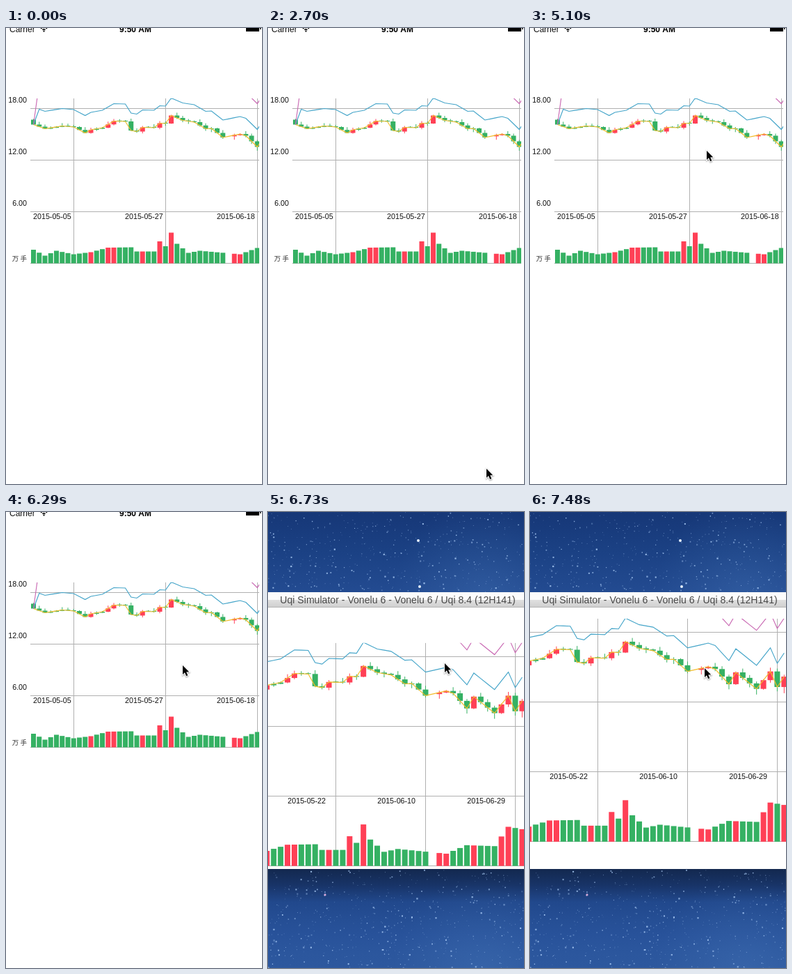
An HTML page with a canvas that plays this animation: 368 by 654 pixels, repeating every 8 s.

```html
<!DOCTYPE html>
<html lang="en">
<head>
<meta charset="utf-8">
<title>Stock chart rotation</title>
<style>
html, body { margin: 0; width: 100%; height: 100%; overflow: hidden; background: #fff; }
canvas { display: block; }
</style>
</head>
<body>
<canvas id="stage" width="368" height="654"></canvas>
<script>
const W = 368, H = 654, LOOP = 8000, ROTATE = 6590, TICK = 150;
const ctx = document.getElementById('stage').getContext('2d');
const RED = '#ff4056', GREEN = '#35b163', GRID = '#b0b0b0';
const FONT = '"Liberation Sans", Arial, sans-serif';
const DAYS = 48, DAY_OFF = 34;

// Daily values on straight lines between turning points [day, value].
function trend(...points) {
  return Array.from({ length: DAYS }, (_, day) => {
    const next = Math.max(1, points.findIndex(p => p[0] >= day));
    const [a, from] = points[next - 1], [b, to] = points[next];
    return from + (to - from) * (day - a) / (b - a);
  });
}

// Portrait pixels: closing price below the 18.00 line, volume above the base.
const close = trend(
  [0, 23], [2, 29], [5, 25], [7, 26.5], [9, 35], [10, 30.5], [12, 27.5], [14, 18], [16, 18.5],
  [17, 31.5], [18, 33], [19, 27], [21, 27.5], [22, 21], [23, 21.5], [24, 10], [26, 17], [28, 19.5],
  [30, 29], [31, 28.5], [33, 41.5], [36, 36.5], [37, 39], [39, 55], [40, 42.5], [43, 60], [45, 41.5],
  [46, 58], [47, 47]);
const volume = trend(
  [0, 19.5], [2, 11], [4, 18], [7, 13], [10, 16], [13, 22.5], [17, 23], [18, 17], [21, 17],
  [22, 31.5], [23, 24.5], [24, 44], [25, 28], [27, 15], [29, 18], [36, 13], [39, 22], [43, 21],
  [45, 41.5], [47, 39]);

const portrait = {
  x0: 39.5, step: 8.25, bar: 7, y0: 115.5, scale: 1, left: 35, right: 364, labelGap: 3.5,
  dates: { 7: '2015-05-05', 23: '2015-05-27', 39: '2015-06-18' }
};
const landscape = {
  x0: -100.9, step: 9.92, bar: 8, scale: 1.353, left: 0, right: W, labelGap: 14.5,
  dates: { 20: '2015-05-22', 33: '2015-06-10', 46: '2015-06-29' }
};

// Pointer moves along quadratic curves: start, end, from, control, to.
const moves = [
  [1500, 1800, [283, 617], [284, 617], [283, 617]],
  [2700, 3150, [313, 631], [262, 480], [241, 369]],
  [4200, 5100, [241, 369], [240, 250], [253, 175]],
  [5250, 6290, [243, 176], [190, 270], [253, 219]],
  [ROTATE, 7480, [253, 219], [254, 207], [250, 223]]
];

function rect(x, y, w, h, color) {
  ctx.fillStyle = color;
  ctx.fillRect(x, y, w, h);
}

function line(points, color, width = 1) {
  ctx.beginPath();
  points.forEach(p => ctx.lineTo(...p));
  ctx.strokeStyle = color;
  ctx.lineWidth = width;
  ctx.stroke();
}

function text(str, x, y, size, align = 'left', color = '#111', weight = '') {
  ctx.font = `${weight} ${size}px ${FONT}`;
  ctx.textAlign = align;
  ctx.fillStyle = color;
  ctx.fillText(str, x, y);
}

function clipped(x, y, w, h, draw) {
  ctx.save();
  ctx.beginPath();
  ctx.rect(x, y, w, h);
  ctx.clip();
  draw();
  ctx.restore();
}

function gradient(y, h, ...colors) {
  const fill = ctx.createLinearGradient(0, y, 0, y + h);
  colors.forEach((color, i) => fill.addColorStop(i / (colors.length - 1), color));
  return fill;
}

function drawDay(c, day, y0, base) {
  const x = c.x0 + day * c.step;
  const change = day ? close[day] - close[day - 1] : 7;
  const color = change < -1.6 ? RED : GREEN; // only clear rises are red
  const end = y0 + close[day] * c.scale;
  const size = Math.max(1, Math.abs(change) * c.scale);
  const top = change > 0 ? end - size : end;
  const high = (1 + day * 7 % 4) * c.scale;
  const low = (.5 + day * 5 % 4) * day / 25 * c.scale;
  line([[x, top - high], [x, top + size + low]], color);
  rect(x - c.bar / 2, top, c.bar, size, color);
  rect(x - c.bar / 2, base, c.bar, -volume[day] * c.scale, color);
}

function drawChart(c, y0 = c.y0, rules = true) {
  const { scale, left, right } = c;
  const top = y0 - 14.5 * scale, base = y0 + 222 * scale;
  const dayX = day => c.x0 + day * c.step;
  const crisp = v => Math.floor(v) + .5;

  clipped(left, top, right - left, base - top + 1, () => {
    for (let i = 0; rules && i < 4; i++) {
      const y = crisp(y0 + i * 74 * scale);
      line([[left, y], [right, y]], GRID);
    }
    for (const day in c.dates) {
      const x = crisp(dayX(+day));
      line([[x, top], [x, base]], GRID);
    }
    for (let day = 0; day < DAYS; day++) {
      if (day !== DAY_OFF) drawDay(c, day, y0, base);
    }
    // The upper bands start at the first close, then keep their distance.
    for (const [offset, color] of [[0, '#f2bd2b'], [25, '#45a5c9'], [62, '#c969b3']]) {
      line(close.map((v, day) => [dayX(day), y0 + (day ? v - offset : v) * scale]), color, 1.15);
    }
  });
  if (rules) {
    for (const day in c.dates) {
      text(c.dates[day], dayX(+day) - c.labelGap, y0 + 148 * scale + 10, 10.7, 'right');
    }
  }
}

function drawPortrait() {
  drawChart(portrait);
  ['18.00', '12.00', '6.00'].forEach((s, i) => text(s, 30, 106.5 + i * 74, 10.7, 'right'));
  ctx.font = '9.5px "Noto Sans CJK SC", "Noto Sans CJK", sans-serif';
  ctx.fillStyle = '#333';
  ctx.fillText('万 手', 30, 334);
}

function drawStatusBar() {
  text('Carrier', 5, 5.5, 12);
  text('9:50 AM', 186, 5.5, 12, 'center', '#000', 'bold');
  rect(345, 0, 19, 5, '#000');
  rect(365, 0, 1.5, 2, '#000');
  for (const r of [2.6, 5.6]) {
    ctx.beginPath();
    ctx.arc(54.5, 4.5, r, -Math.PI * .78, -Math.PI * .22);
    ctx.strokeStyle = '#000';
    ctx.lineWidth = 1.6;
    ctx.stroke();
  }
  rect(53.5, 3.5, 2, 2, '#000');
}

function drawSky(y, h, seed, ...colors) {
  const random = () => (seed = seed * 16807 % 2147483647) / 2147483647;
  rect(0, y, W, h, gradient(y, h, ...colors));
  const glow = ctx.createRadialGradient(310, y + h, 5, 310, y + h, 130);
  glow.addColorStop(0, 'rgba(80,130,195,.25)');
  glow.addColorStop(1, 'rgba(80,130,195,0)');
  rect(0, y, W, h, glow);
  for (let i = 0; i < h * 4; i++) {
    const size = .7 + random() ** 4 * 1.6;
    rect(random() * W, y + random() * h, size, size, `rgba(175,208,250,${.25 + random() * .65})`);
  }
}

function dot(x, y, r, color) {
  ctx.beginPath();
  ctx.arc(x, y, r, 0, Math.PI * 2);
  ctx.fillStyle = color;
  ctx.fill();
}

function drawDesktop() {
  drawSky(0, 115, 71, '#163777', '#1b4184', '#234b91');
  drawSky(512, 142, 913, '#13284f', '#183468', '#21488c', '#254e94', '#28529a', '#2b569d', '#2d589e');
  dot(216, 41, 2, '#e6f2ff');
  dot(218, 107, 2, '#e6f2ff');
  dot(82, 549, 1.6, '#d9a8d8');
  rect(0, 115, W, 11, '#fcfcfc');
  rect(0, 126, W, 10, gradient(126, 10, '#e0e0e0', '#d0d0d0'));
  rect(0, 136, W, 1, '#b4b4b4');
  text('Uqi Simulator - Vonelu 6 - Vonelu 6 / Uqi 8.4 (12H141)', 186.5, 131, 14.1, 'center', '#484848');
}

function drawRotation(step) {
  drawDesktop();
  const shift = step < 6 ? 242 * Math.exp(-1.94 * step) : 0;
  clipped(0, 137, W, 375, () => drawChart(landscape, 172.5 + shift, step > 0));
  if (step === 0) {
    clipped(0, 137, W, 243, () => {
      ctx.translate(511, 138);
      ctx.rotate(Math.PI / 2);
      drawPortrait();
    });
  }
}

function drawPointer([start, end, from, control, to], step) {
  const k = step / Math.round((end - start) / TICK);
  const [x, y] = from.map((v, i) =>
    Math.round(v * (1 - k) ** 2 + 2 * control[i] * k * (1 - k) + to[i] * k * k));
  ctx.save();
  ctx.translate(x + 1, y + 1);
  ctx.beginPath();
  [[0, 0], [0, 13], [3, 10.2], [5.2, 15.2], [7.4, 14.2], [5.2, 9.4], [9.2, 9.2]].forEach(p => ctx.lineTo(...p));
  ctx.closePath();
  ctx.shadowColor = 'rgba(0,0,0,.4)';
  ctx.shadowBlur = 2;
  ctx.shadowOffsetY = 1;
  ctx.strokeStyle = '#fff';
  ctx.lineWidth = 2;
  ctx.stroke();
  ctx.shadowColor = 'transparent';
  ctx.fillStyle = '#000';
  ctx.fill();
  ctx.restore();
}

function draw(t) {
  rect(0, 0, W, H, '#fff');
  const move = moves.filter(m => t >= m[0]).pop();
  let step = 0;
  if (move) {
    const [start, end] = move;
    const steps = Math.round((end - start) / TICK);
    // Screen updates land up to 10 ms before an even tick.
    step = Math.min(steps, Math.floor((t - start + 10) / TICK));
  }
  if (t < ROTATE) {
    drawStatusBar();
    drawPortrait();
  } else {
    drawRotation(step);
  }
  if (move) drawPointer(move, step);
}

const begin = performance.now();
function tick() {
  draw((performance.now() - begin) % LOOP);
  requestAnimationFrame(tick);
}
tick();
</script>
</body>
</html>
```
